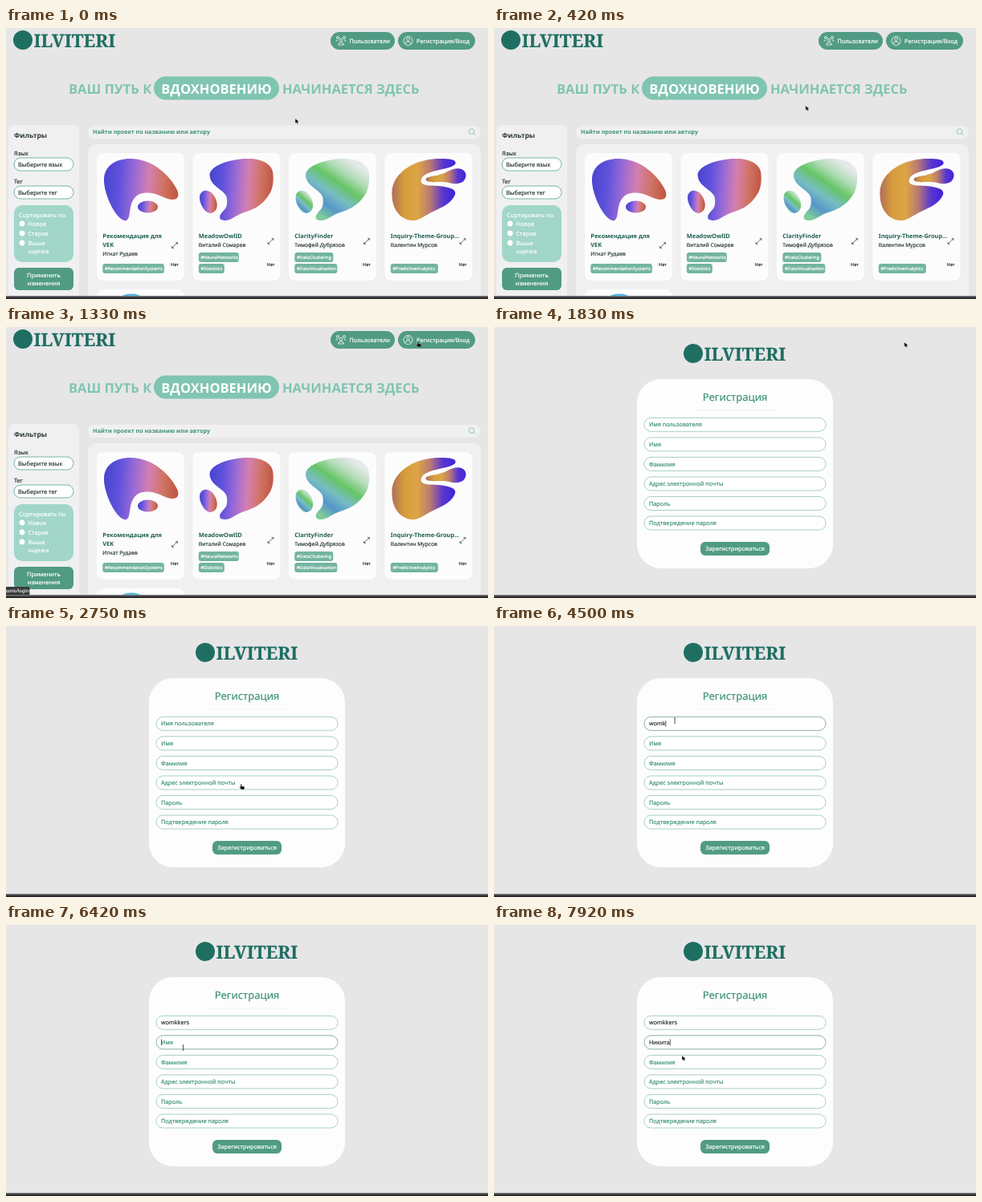
These frames come from a looping animation (600 by 338 pixels, 8 s). An HTML page:

```html
<!DOCTYPE html>
<html lang="ru">
<head>
<meta charset="utf-8">
<title>Регистрация</title>
<style>
  html, body { margin: 0; width: 100%; height: 100%; overflow: hidden; background: #e7e6e7; }
  svg { display: block; width: 100%; height: 100%; }
  text { font-family: "Noto Sans", "Open Sans", sans-serif; white-space: pre; text-rendering: geometricPrecision;
    fill: currentColor; stroke: currentColor; stroke-width: .18px; }
  .bold { font-weight: 700; stroke: none; }
  .brand { font: 900 22.5px "Noto Serif", "DejaVu Serif", serif; }
</style>
</head>
<body>
<svg id="stage" viewBox="0 0 600 338" xmlns="http://www.w3.org/2000/svg"></svg>
<script>
const GREEN = '#519b84', MINT = '#80c5b1', INK = '#2b3836', TEAL = '#1f6e62', PANEL = '#f0f0f1', LABEL = '#3f927a';
const LOOP = 8000;
const ROW_STEP = 24.55;

const rect = (x, y, w, h, r, fill, stroke = 'none') =>
  `<rect x="${x}" y="${y}" width="${w}" height="${h}" rx="${r}" fill="${fill}" stroke="${stroke}" stroke-width=".8"/>`;
const text = (x, y, size, color, str, extra = '') =>
  `<text x="${x}" y="${y}" font-size="${size}" color="${color}" ${extra}>${str}</text>`;
const path = (d, fill, extra = '') => `<path d="${d}" fill="${fill}" ${extra}/>`;
const bold = ' class="bold"';
const centred = ' text-anchor="middle"';

const gradient = (id, colors, angle) =>
  `<linearGradient id="${id}" gradientTransform="rotate(${angle} .5 .5)">` +
  colors.map((c, i) => `<stop offset="${i / (colors.length - 1)}" stop-color="${c}"/>`).join('') +
  '</linearGradient>';

const defs = `<defs>
  ${gradient('sunset', ['#4a45cf', '#5f52dc', '#9a6ad6', '#d47fb0', '#cf7362', '#c05340'], 3)}
  ${gradient('meadow', ['#e4e9e9', '#b2dcb8', '#66c566', '#78bcc4', '#5596c9', '#7fcb9a'], 125)}
  ${gradient('amber', ['#b0705a', '#d89c3c', '#dda546', '#b97a72', '#5a37cf', '#3f22dc'], 0)}
  ${gradient('edge', ['#8a8a8c', '#39393b', '#202022'], 90)}
</defs>`;

const brand = (x, y) => `<g transform="translate(${x} ${y})" color="${TEAL}">
  <circle cx="13" cy="12" r="12" fill="${TEAL}"/><text class="brand" x="26.5" y="20.8">ILVITERI</text></g>`;

// Blobs share a 94 x 78 box.
const pebble = 'M13 20C14 8 40 0 61 0C80 0 92 8 92 20C93 33 90 42 84 49C77 59 66 64 56 67C46 70 39 78 31 77' +
  'C26 77 25 74 26 70.6C28 66 34 63 34.5 57C35 51 35 47 31 43C26 37 13 32 13 20Z';
const pebbleSmall = 'M2 43C6 37 15 39 20 49C25 60 21 67 14 68C6 68-3 51 2 43Z';
const blobs = {
  wave: path('M1 25C2 9 15 0 34 0C62 0 84 22 92 39C97 51 88 54 75 48C62 41 46 40 39 49C31 59 35 74 29 77C18 80 0 45 1 25Z', 'url(#sunset)') +
    '<ellipse cx="55.5" cy="60" rx="12.5" ry="7.5" fill="url(#sunset)"/>',
  pebbles: path(pebble, 'url(#sunset)') + path(pebbleSmall, 'url(#sunset)'),
  leaves: path(pebble, 'url(#meadow)') + path(pebbleSmall, 'url(#meadow)'),
  claw: path('M1 41C2 17 30 0 60 0C74 0 81 1 80 6C78 11 66 12 56 15C46 17 37 21 37 28C38 36 54 32 66 35C76 37 82 39 79 46C74 57 60 62 48 68C38 74 32 78 24 77C8 74 0 59 1 41Z', 'url(#amber)') +
    path('M43 26C43 21 58 23 70 16C80 10 92 11 93 20C93 31 82 33 72 30C62 27 44 32 43 26Z', 'url(#amber)'),
};

const expandIcon = (x, y) => path(
  `M${x - 3.4} ${y + 3.4}L${x + 3.4} ${y - 3.4}M${x + 1} ${y - 3.4}h2.4v2.4M${x - 3.4} ${y + 1}v2.4h2.4`,
  'none', `stroke="${INK}" stroke-width=".7"`);

const chip = (x, y, w, label) => rect(x, y, w, 12, 3, '#73b5a1') + text(x + 2.7, y + 8, 5.6, '#fff', label);

function card(index, blob, titleLines, author, chips) {
  const x = 113 + index * 119.5, left = x + 7.3, extra = titleLines.length - 1;
  return rect(x, 156, 109, 159, 8, '#fcfcfd') +
    `<g transform="translate(${x + 8} 163)">${blobs[blob]}</g>` +
    titleLines.map((s, i) => text(left, 262 + 11 * i, 7.4, '#1f5f50', s, bold)).join('') +
    text(left, 273 + 11 * extra, 6.7, INK, author) +
    chips.map(([w, label], i) => chip(left, 294 - 14 * (chips.length - 1 - i), w, label)).join('') +
    text(x + 92, 297, 5.6, INK, 'Нет') + expandIcon(x + 97, 266 + 5 * extra);
}

const select = (y, label, value) => text(10, y - 3, 7.4, INK, label) +
  rect(10, y, 74, 16, 8, '#fff', '#5aa58e') + text(15, y + 11, 7.4, INK, value);

const option = (y, label) => `<circle cx="20" cy="${y}" r="3.4" fill="#fff"/>` + text(27.5, y + 2.7, 7.3, '#fff', label);

const usersIcon = `<g fill="none" stroke="#fff" stroke-width=".8">
  <circle cx="413" cy="12" r="1.5"/><circle cx="421" cy="12" r="1.5"/><circle cx="417" cy="15" r="1.8"/>
  <path d="M411 17q0-2 2-2M423 17q0-2-2-2M413.5 21q0-3 3.5-3t3.5 3z"/></g>`;
const userIcon = `<g fill="none" stroke="#fff" stroke-width=".8">
  <circle cx="500.5" cy="16" r="5.6"/><circle cx="500.5" cy="14" r="1.9"/><path d="M496.8 20q.3-3 3.7-3t3.7 3"/></g>`;

const home = `<g id="home">
  ${brand(8, 3)}
  ${rect(404, 5, 80, 22, 11, GREEN)}${usersIcon}${text(427.5, 18.6, 7.2, '#fff', 'Пользователи')}
  ${rect(488, 5, 96, 22, 11, GREEN)}${userIcon}${text(511, 18.6, 7.4, '#fff', 'Регистрация/Вход')}
  ${text(78, 81.5, 16.5, MINT, 'ВАШ ПУТЬ К', bold)}
  ${rect(184, 60.5, 156, 29, 14.5, MINT)}${text(262, 81.5, 16.5, '#fff', 'ВДОХНОВЕНИЮ', bold + centred)}
  ${text(344, 81.5, 16.5, MINT, 'НАЧИНАЕТСЯ ЗДЕСЬ', bold)}
  ${rect(3, 121, 88, 230, 8, PANEL)}${text(10, 137, 8.5, INK, 'Фильтры', bold)}
  ${select(162, 'Язык', 'Выберите язык')}${select(197, 'Тег', 'Выберите тег')}
  ${rect(10, 221, 74, 71, 10, '#a1d6c8')}${text(16, 235.5, 7.4, '#fff', 'Сортировать по')}
  ${option(244, 'Новое')}${option(256, 'Старое')}${option(268, 'Выше')}${text(27.5, 281, 7.3, '#fff', 'оценка')}
  ${rect(10, 299, 74, 28, 6, GREEN)}
  ${text(47, 310.5, 7.4, '#fff', 'Применить', centred)}${text(47, 321, 7.4, '#fff', 'изменения', centred)}
  ${rect(102, 122, 489, 16, 8, PANEL)}${text(108, 132.3, 7.1, LABEL, 'Найти проект по названию или автору', bold)}
  <g fill="none" stroke="${MINT}" stroke-width=".9"><circle cx="579.5" cy="129" r="3.3"/><path d="M582 131.5l2.3 2.3"/></g>
  ${rect(102, 145, 489, 210, 10, PANEL)}
  ${card(0, 'wave', ['Рекомендация для', 'VEK'], 'Игнат Рудаев', [[76.5, '#RecommendationSystems']])}
  ${card(1, 'pebbles', ['MeadowOwlID'], 'Виталий Сомарев', [[50, '#NeuralNetworks'], [32, '#Statistics']])}
  ${card(2, 'leaves', ['ClarityFinder'], 'Тимофей Дубрязов', [[48, '#DataClustering'], [53, '#DataVisualization']])}
  ${card(3, 'claw', ['Inquiry-Theme-Group...'], 'Валентин Мурсов', [[59, '#PredictiveAnalytics']])}
  ${rect(113, 326, 109, 40, 8, '#fcfcfd')}<ellipse cx="156" cy="350" rx="24" ry="18.5" fill="#55b9de"/>
  <g id="status">${rect(0, 324, 29.5, 10, 1, '#38393b')}${text(0, 331.3, 5.8, '#e4e4e4', 'sons/login/')}</g>
</g>`;

const labels = ['Имя пользователя', 'Имя', 'Фамилия', 'Адрес электронной почты', 'Пароль', 'Подтверждение пароля'];
const field = (label, i) => {
  const y = 113.3 + i * ROW_STEP;
  return `<g class="field">${rect(187, y, 226, 17, 8.5, '#fff')}${text(193, y + 11.1, 7.2, LABEL, label)}</g>`;
};

const signup = `<g id="signup">
  ${brand(235, 21)}
  ${rect(178, 65, 244, 236, 30, '#fdfdfd')}
  ${text(300, 91.7, 13, LABEL, 'Регистрация', centred)}
  ${rect(250, 103.5, 100, 0.8, 0, '#efefef')}
  ${labels.map(field).join('')}
  ${rect(257, 268, 86, 17, 6, GREEN)}${text(300, 279.1, 7.3, '#fff', 'Зарегистрироваться', centred)}
  <rect id="caret" width=".7" height="8" fill="#222"/>
</g>`;

const pointers = `<g id="pointer">
  <path id="arrow" d="M0 0V5.8L1.5 4.7L2.5 6.7L3.8 6L2.9 4.2L4.7 3.8Z" fill="#111" stroke="#fff" stroke-width=".3"/>
  <path id="hand" d="M0 .4Q.7-.6 1.3.5V2.6L4.5 3.3Q5.2 3.6 5 4.5L4.4 7H1L-1.4 4.2Q-1.2 3 0 3.9Z" fill="#111" stroke="#fff" stroke-width=".3"/>
  <path id="beam" d="M0-3V3M-.9-3.1H.9M-.9 3.1H.9" fill="none" stroke="#333" stroke-width=".8"/>
</g>`;

document.getElementById('stage').innerHTML = defs + rect(0, 0, 600, 338, 0, '#e7e6e7') + home + signup +
  rect(0, 334, 600, 4, 0, 'url(#edge)') + pointers;

const el = id => document.getElementById(id);
const show = (id, on) => el(id).setAttribute('visibility', on ? 'inherit' : 'hidden');
const fields = [...document.querySelectorAll('.field')].map(g => ({ box: g.children[0], label: g.children[1] }));

const typed = [
  { value: 'womkkers', focus: 3650, blur: 5350, start: 4000, step: 150 },
  { value: 'Никита', focus: 5350, blur: LOOP, start: 7050, step: 150 },
];

// Pointer stops: time, x, y.
const stops = [
  [0, 360, 113], [250, 360, 113], [800, 481, 43], [900, 481, 43], [1250, 512, 18], [1800, 512, 18],
  [2500, 292, 197], [3000, 292, 197], [3600, 225, 118], [5050, 225, 118], [5330, 220.5, 153],
  [7500, 220.5, 153], [7850, 234, 163], [LOOP, 234, 163],
];
// Each pointer shape lasts until the time given.
const shapes = [[1250, 'arrow'], [1550, 'hand'], [2500, 'arrow'], [3250, 'hand'], [7600, 'beam'], [LOOP, 'arrow']];

function pointerAt(t) {
  const i = stops.findIndex(s => s[0] > t);
  const [t0, x0, y0] = stops[i - 1], [t1, x1, y1] = stops[i];
  const k = (t - t0) / (t1 - t0), e = k * k * (3 - 2 * k);
  return [x0 + (x1 - x0) * e, y0 + (y1 - y0) * e];
}

function drawFields(t) {
  let caretOn = false;
  fields.forEach(({ box, label }, i) => {
    const entry = typed[i];
    const focused = entry && t >= entry.focus && t < entry.blur;
    const count = entry ? Math.min(entry.value.length, Math.max(0, Math.floor((t - entry.start) / entry.step) + 1)) : 0;
    label.textContent = count ? entry.value.slice(0, count) : labels[i];
    label.setAttribute('color', count ? '#2c2f2f' : LABEL);
    box.setAttribute('stroke', focused ? '#6f9d8e' : '#92c4b4');
    if (!focused) return;
    const lastKey = count ? entry.start + (count - 1) * entry.step : entry.focus;
    caretOn = (t - lastKey) % 1000 < 500;
    el('caret').setAttribute('x', 193 + (count ? label.getComputedTextLength() : 0));
    el('caret').setAttribute('y', 117.8 + i * ROW_STEP);
  });
  show('caret', caretOn);
}

function draw(t) {
  const atHome = t < 1550;
  show('home', atHome);
  show('signup', !atHome);
  show('status', atHome && t >= 1250);
  drawFields(t);
  const shape = shapes.find(s => t < s[0])[1];
  ['arrow', 'hand', 'beam'].forEach(id => show(id, id === shape));
  // A nested "inherit" keeps the caret and status hidden with their page.
  el('pointer').setAttribute('transform', `translate(${pointerAt(t)})`);
}

const begin = performance.now();
function tick() {
  draw((performance.now() - begin) % LOOP);
  requestAnimationFrame(tick);
}
tick();
</script>
</body>
</html>
```
